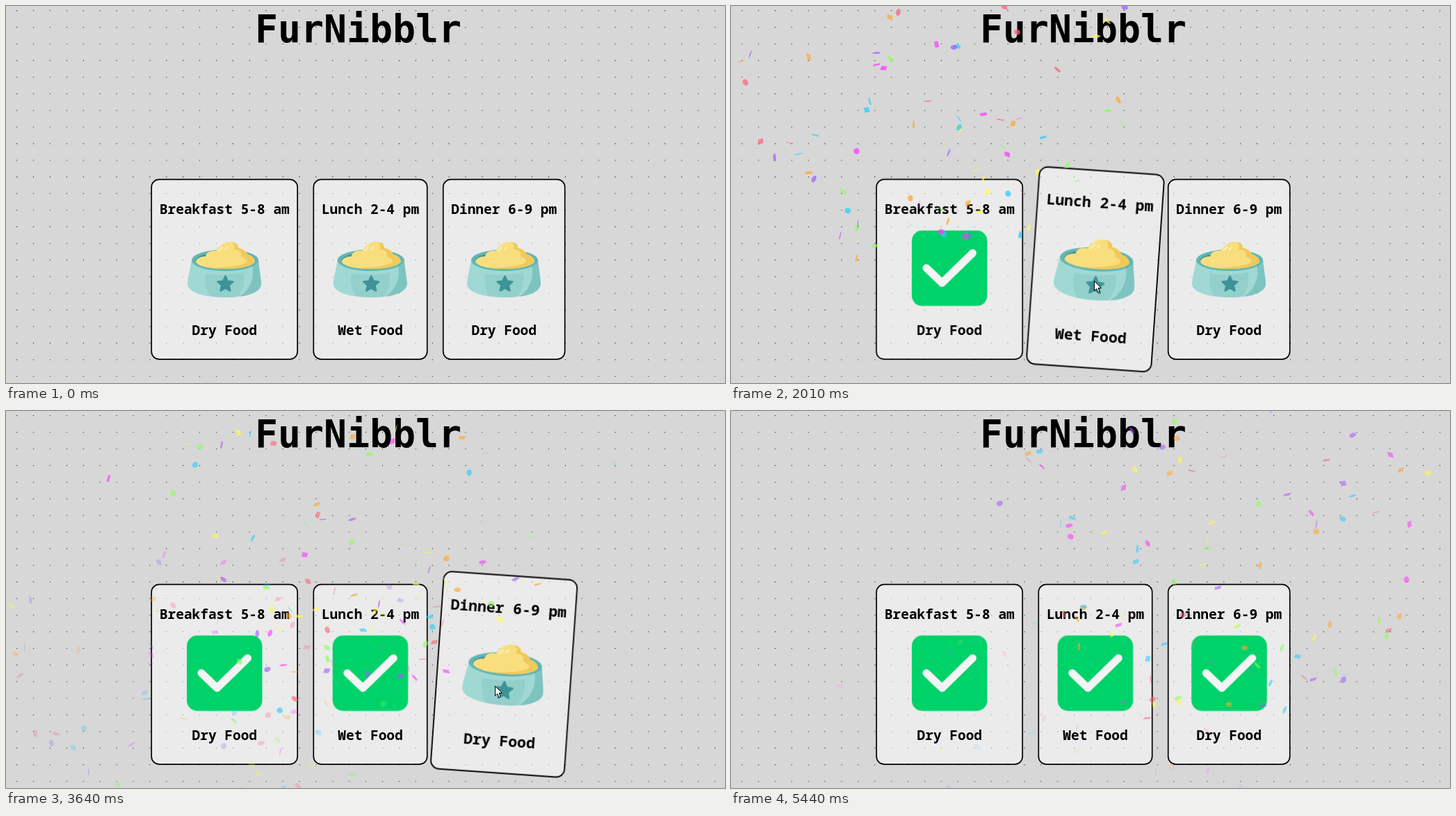
An HTML page with a canvas for the animation above (5.49 s loop, 1034 by 542 pixels).

```html
<!DOCTYPE html>
<html lang="en">
<head>
<meta charset="utf-8">
<title>FurNibblr</title>
<style>
  html, body { margin: 0; width: 100%; height: 100%; overflow: hidden; background: #d7d7d7; }
  svg, canvas { position: absolute; left: 0; top: 0; display: block; }
  #dots { fill: none; stroke: #000; stroke-width: 1.2; stroke-linecap: round; }
  text { text-anchor: middle; font: bold 19.48px "Noto Sans Mono", "DejaVu Sans Mono", monospace; }
  .title { font: bold 54.8px "DejaVu Sans Mono", monospace; }
  .card rect { fill: rgba(255, 255, 255, .5); stroke: #000; stroke-width: 1.7; }

  .card, .done, #cursor { animation: 5490ms infinite; }
  .card { animation-timing-function: ease; }
  .done { animation-timing-function: step-end; }
  #cursor { animation-name: point; animation-timing-function: ease-in-out; }

  #breakfast { transform-origin: 314.2px 378.6px; animation-name: hover1; }
  #lunch { transform-origin: 524px 378.6px; animation-name: hover2; }
  #dinner { transform-origin: 716.2px 378.6px; animation-name: hover3; }
  #breakfast .done { animation-name: done1; }
  #lunch .done { animation-name: done2; }
  #dinner .done { animation-name: done3; }

  @keyframes hover1 {
    0%, 8.8%, 37.2%, 100% { transform: none; }
    14.2%, 31.7% { transform: rotate(4deg) scale(1.1); }
  }
  @keyframes hover2 {
    0%, 31.9%, 57.9%, 100% { transform: none; }
    37.3%, 52.5% { transform: rotate(4deg) scale(1.1); }
  }
  @keyframes hover3 {
    0%, 56.2%, 96.5%, 100% { transform: none; }
    61.7%, 91% { transform: rotate(4deg) scale(1.1); }
  }
  @keyframes done1 { 0% { opacity: 0; } 18.2%, 100% { opacity: 1; } }
  @keyframes done2 { 0% { opacity: 0; } 41%, 100% { opacity: 1; } }
  @keyframes done3 { 0% { opacity: 0; } 69.5%, 100% { opacity: 1; } }
  @keyframes point {
    0%, 5.2% { transform: translate(905px, 560px); }
    6.2% { transform: translate(896px, 527px); }
    13%, 28% { transform: translate(302px, 387px); }
    34%, 50.5% { transform: translate(522px, 395px); }
    52.46% { transform: translate(616px, 531px); }
    53.3% { transform: translate(640px, 560px); }
    54.6% { transform: translate(680px, 560px); }
    60%, 90% { transform: translate(703px, 395px); }
    93.5%, 100% { transform: translate(715px, 560px); }
  }
</style>
</head>
<body>
<svg width="1034" height="542" viewBox="0 0 1034 542">
  <defs>
    <g id="bowl">
      <path fill="#a0d8d4" d="M7 42C5 56 1 68 1 77C2 90 30 96 54 96S106 90 107 77C107 68 104 56 103 42Z"/>
      <path fill="#93cfcb" d="M27 62Q54 66 82 60Q84 80 74 95Q54 97 33 94Q24 80 27 62Z"/>
      <path fill="#7dc4c0" d="M103 42C104 56 107 68 107 77C106 88 90 93 76 95C92 84 98 66 94 50Z"/>
      <ellipse cx="55" cy="42.5" rx="48" ry="15.5" fill="#62b6b2"/>
      <ellipse cx="55" cy="43" rx="42.5" ry="12" fill="#3f9395"/>
      <path fill="#f9de7e" d="M13 45C13 40 20 37 27 37C28 31 34 28 42 29C46 24 52 16 61 16C70 16 74 20 74 25C82 26 86 31 87 34C94 36 98 40 98 45C92 52 74 55 55 55S17 52 13 45Z"/>
      <path fill="#f1c95b" d="M64 16.5C72 17 75 21 74 25C82 26 86 31 87 34C94 36 98 40 98 45C92 52 74 55 55 55Q43 55 34 53.5C60 54 86 49 86 44C86 40 80 38 78 37C80 30 74 27 68 27C70 22 68 18 64 16.5Z"/>
      <path fill="none" stroke="#fdf0b8" stroke-width="2" stroke-linecap="round" d="M46 29l5-5M55 27l3-3"/>
      <path transform="translate(55.5 77)" fill="#3d9396" stroke="#3d9396" stroke-width="2.5" stroke-linejoin="round"
        d="M0-11.5L3.2-4.4 10.9-3.6 5.2 1.7 6.8 9.3 0 5.5-6.8 9.3-5.2 1.7-10.9-3.6-3.2-4.4Z"/>
    </g>
    <g id="check">
      <rect width="108.5" height="108.5" rx="15" fill="#00d26a"/>
      <path fill="none" stroke="#f4f4f4" stroke-width="11" stroke-linecap="round" stroke-linejoin="round" d="M21 54L43.5 75.5 87.5 32.5"/>
    </g>
  </defs>

  <path id="dots"/>
  <text class="title" x="506.5" y="51.5">FurNibblr</text>

  <g class="card" id="breakfast">
    <rect x="209.2" y="249.4" width="210" height="258.4" rx="11"/>
    <text x="314.3" y="298.5">Breakfast 5-8 am</text>
    <use href="#bowl" x="260" y="323"/>
    <use class="done" href="#check" x="260" y="322.7"/>
    <text x="314.3" y="473">Dry Food</text>
  </g>
  <g class="card" id="lunch">
    <rect x="442.3" y="249.4" width="163.4" height="258.4" rx="11"/>
    <text x="524" y="298.5">Lunch 2-4 pm</text>
    <use href="#bowl" x="469.7" y="323"/>
    <use class="done" href="#check" x="469.7" y="322.7"/>
    <text x="524" y="473">Wet Food</text>
  </g>
  <g class="card" id="dinner">
    <rect x="628.7" y="249.4" width="175" height="258.4" rx="11"/>
    <text x="716.2" y="298.5">Dinner 6-9 pm</text>
    <use href="#bowl" x="662" y="323"/>
    <use class="done" href="#check" x="662.2" y="322.7"/>
    <text x="716.2" y="473">Dry Food</text>
  </g>
</svg>

<canvas id="confetti" width="1034" height="542"></canvas>

<svg width="1034" height="542" viewBox="0 0 1034 542">
  <path id="cursor" fill="#fff" stroke="#000" d="M.5.5V14.5L3.7 11.5 6 17 8.3 16 6 10.5H10.5Z"/>
</svg>

<script>
  const LOOP = 5490, TICK = 18, LIFE = 200, PIECES = 90, DECAY = 0.9, GRAVITY = 3;
  const COLORS = ['#26ccff', '#a25afd', '#ff5e7e', '#88ff5a', '#fcff42', '#ffa62d', '#ff36ff'];
  const ctx = document.getElementById('confetti').getContext('2d');

  let grid = '';
  for (let y = 6.7; y < 542; y += 23.9)
    for (let x = 15.7; x < 1034; x += 23.9) grid += `M${x.toFixed(1)} ${y.toFixed(1)}h.01`;
  document.getElementById('dots').setAttribute('d', grid);

  function seeded(seed) {
    return () => {
      seed = (seed + 0x6d2b79f5) | 0;
      let h = Math.imul(seed ^ (seed >>> 15), 1 | seed);
      h = (h + Math.imul(h ^ (h >>> 7), 61 | h)) ^ h;
      return ((h ^ (h >>> 14)) >>> 0) / 4294967296;
    };
  }

  function burst(start, x, y, seed) {
    const rand = seeded(seed);
    const pieces = Array.from({ length: PIECES }, (_, i) => ({
      color: COLORS[i % COLORS.length],
      round: rand() < 0.5,
      angle: -Math.PI / 2 + (rand() - 0.5) * 70 * Math.PI / 180,
      speed: 45 * (0.5 + rand()),
      wobble: rand() * 10,
      wobbleSpeed: Math.min(0.11, rand() * 0.1 + 0.05),
      tilt: (rand() * 0.5 + 0.25) * Math.PI
    }));
    return { start, x, y, pieces };
  }

  const bursts = [
    burst(1000, 302, 388, 11),
    burst(2250, 522, 395, 27),
    burst(3815, 703, 396, 43)
  ];

  function drawPiece(p, ox, oy, n) {
    const reach = p.speed * (1 - DECAY ** n) / (1 - DECAY);
    const x = ox + Math.cos(p.angle) * reach;
    const y = oy + Math.sin(p.angle) * reach + GRAVITY * n;
    const wobble = p.wobble + p.wobbleSpeed * n;
    const tilt = p.tilt + 0.1 * n;
    const wx = 10 * Math.cos(wobble), wy = 10 * Math.sin(wobble);
    const tx = 2.5 * Math.cos(tilt), ty = 2.5 * Math.sin(tilt);

    ctx.fillStyle = p.color;
    ctx.beginPath();
    if (p.round) {
      ctx.ellipse(x, y, Math.abs(wx) * 0.6, Math.abs(wy) * 0.6, Math.PI / 10 * wobble, 0, 2 * Math.PI);
    } else {
      ctx.moveTo(x, y);
      ctx.lineTo(x + wx, y + ty);
      ctx.lineTo(x + wx + tx, y + wy + ty);
      ctx.lineTo(x + tx, y + wy);
    }
    ctx.fill();
  }

  let origin;
  function frame(now) {
    origin ??= now;
    const t = (now - origin) % LOOP;
    ctx.clearRect(0, 0, 1034, 542);
    for (const b of bursts) {
      const n = (t - b.start) / TICK;
      if (n < 0 || n > LIFE) continue;
      ctx.globalAlpha = 1 - n / LIFE;
      for (const p of b.pieces) drawPiece(p, b.x, b.y, n);
    }
    requestAnimationFrame(frame);
  }
  requestAnimationFrame(frame);
</script>
</body>
</html>
```
